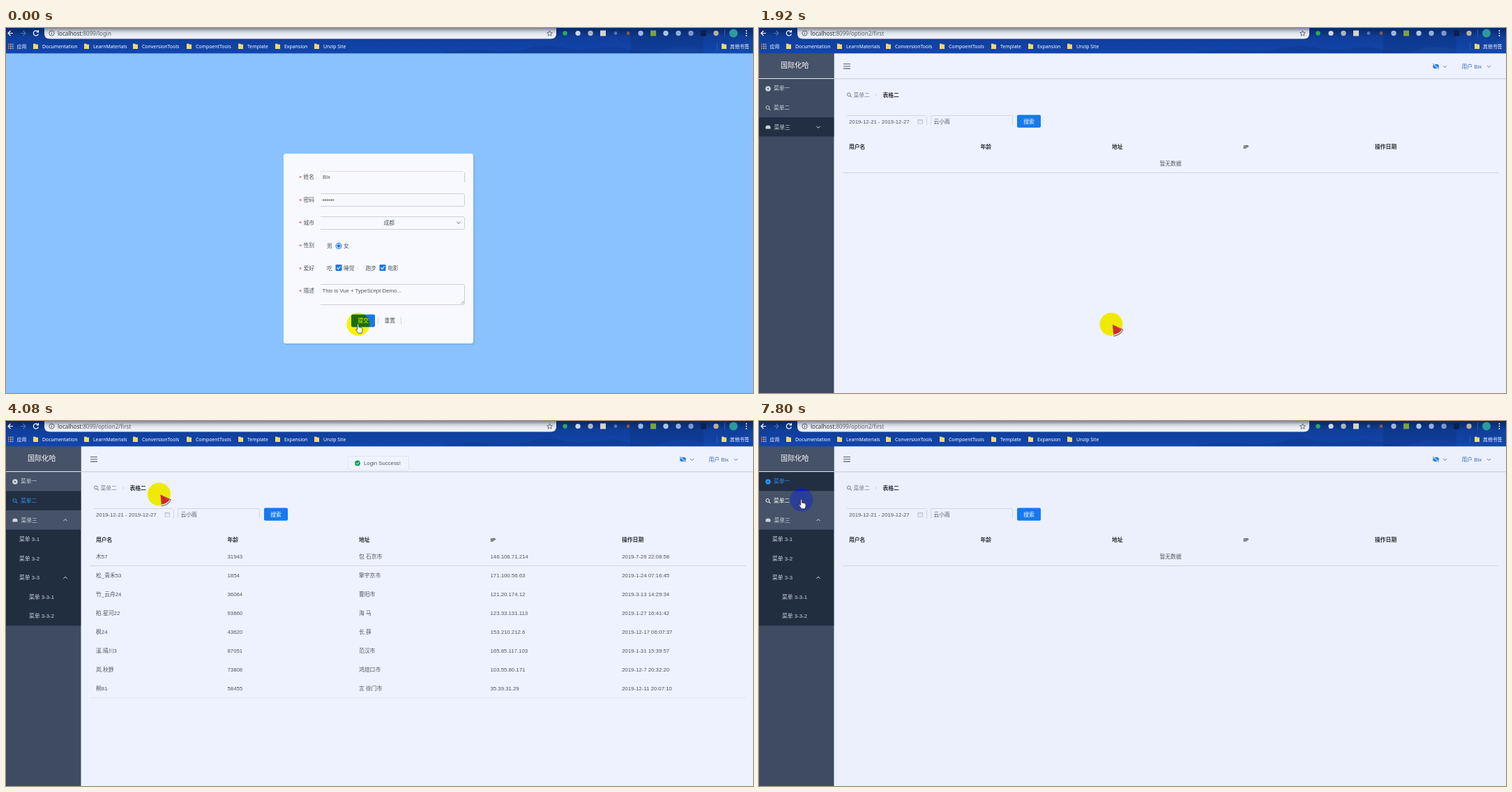
Animation, 1071 px wide and 523 px high, one loop 8000 ms. Source, as an HTML page:

```html
<!DOCTYPE html>
<html>
<head>
<meta charset="utf-8">
<title>Admin demo</title>
<style>
html, body { margin: 0; width: 100%; height: 100%; overflow: hidden; background: #8ac2ff; }
svg { display: block; width: 1071px; height: 523px; isolation: isolate; }
text { font: 7.8px "Liberation Sans", "Noto Sans CJK SC", "Noto Sans CJK", sans-serif; fill: #51565f; white-space: pre; }
.ui { font-family: "Noto Sans", "Noto Sans CJK SC", "Noto Sans CJK", sans-serif; }
.bold { font-weight: bold; fill: #2f343d; }
#spot { mix-blend-mode: difference; }
</style>
</head>
<body>
<svg id="stage" viewBox="0 0 1071 523" xmlns="http://www.w3.org/2000/svg"></svg>
<script>
const LOOP = 8000;
const USER = 'Bix';

const text = (x, y, s, attrs = '') => `<text x="${x}" y="${y + 2.8}" ${attrs}>${s}</text>`;
const rect = (x, y, w, h, fill, attrs = '') =>
  `<rect x="${x}" y="${y}" width="${w}" height="${h}" fill="${fill}" ${attrs}/>`;
const line = (d, stroke, width = 1, attrs = '') =>
  `<path d="${d}" fill="none" stroke="${stroke}" stroke-width="${width}" ${attrs}/>`;
const dot = (x, y, r, fill, attrs = '') => `<circle cx="${x}" cy="${y}" r="${r}" fill="${fill}" ${attrs}/>`;
const chevron = (x, y, color, up = 1) =>
  line(`M${x - 2.5} ${y - 1.2 * up}l2.5 ${2.5 * up} 2.5 ${-2.5 * up}`, color, 1);
const lens = (x, y, color) => line(`M${x + 1.3} ${y + 1.3}l2 2`, color, 1.1) +
  dot(x - .6, y - .6, 2.4, 'none', `stroke="${color}" stroke-width="1"`);
const group = (id, body, attrs = '') => `<g id="${id}" ${attrs}>${body}</g>`;

function browserBar() {
  const bookmarks = [['Documentation', 52], ['LearnMaterials', 125], ['ConversionTools', 195],
    ['CompoentTools', 272], ['Template', 346], ['Expansion', 399], ['Unzip Site', 455]];
  const folder = x => `<path d="M${x} 22.5h3l1 1h3v6.5h-7z" fill="#f3d675"/>`;
  const label = (x, s) => text(x, 26, s, 'class="ui" style="font-size:6.9px;fill:#fff"');
  const extensions = ['#aeb4bf', '#d8d4c4', '#5274b8', '#8a5a48', '#9db4de', '#7da33a', '#a9c6ea',
    '#8fb0dc', '#7d97c8', '#0a2150', '#b9ad9c'];
  let out = rect(0, 0, 1071, 36.4, 'url(#bar)') +
    `<path d="M620 36q40-7 75-4t60-4q25-6 45 0t70-2l50 10z" fill="#0b3480" opacity=".35"/>` +
    rect(895, 0, 105, 36, '#0a2b70', 'opacity=".3"') +
    `<path d="M930 36q30-13 60-7t81-14v21z" fill="#1a4da5" opacity=".3"/>` +
    line('M10 7.5H3m3.5-3.5L3 7.5 6.5 11', '#fff', 1.2) +
    line('M21 7.5h7m-3.5-3.5 3.5 3.5-3.5 3.5', '#4b72bd', 1.1) +
    line('M46 5.5a3.6 3.6 0 1 0 .4 3M46.5 3v3h-3', '#fff', 1.2) +
    `<path d="M55 0H789V8q0 7.5-8 7.5H63Q55 15.5 55 8z" fill="url(#omni)"/>` +
    dot(65.5, 7.5, 3.6, 'none', 'stroke="#4d535e" stroke-width=".9"') + line('M65.5 7v2.5M65.5 5.3v.9', '#4d535e', .9) +
    `<text id="url" class="ui" x="74" y="10.5" style="font-size:8.1px;fill:#5a606b"></text>` +
    `<path d="M779.5 3.8l1.1 2.6 2.8.2-2.1 1.8.7 2.8-2.5-1.5-2.5 1.5.7-2.8-2.1-1.8 2.8-.2z" fill="none" stroke="#4d535e" stroke-width=".8"/>` +
    dot(801.5, 7.5, 3.2, '#2fa85f') + dot(820, 7.5, 3.6, '#cfd8e8');
  extensions.forEach((color, i) => {
    const x = 838 + 18 * i;
    const square = i % 4 == 1;
    out += square ? rect(x - 4, 3.5, 8, 8, color) : dot(x, 7.5, i == 2 || i == 3 ? 2.4 : 3.7, color);
  });
  out += line('M1030.5 2v11', '#2d5aae') + dot(1043, 7.5, 6, '#2b9c9c');
  [4, 7.5, 11].forEach(y => out += dot(1061.5, y, .9, '#fff'));
  for (let i = 0; i < 9; i++)
    out += rect(3 + i % 3 * 2.9, 22.5 + (i / 3 | 0) * 2.9, 1.8, 1.8, ['#e8695b', '#e9b949', '#7fb2ea'][i % 3]);
  out += label(15.5, '应用') + label(1038, '其他书签') + folder(1026) + line('M1019.5 21v10', '#2d5aae');
  bookmarks.forEach(([s, x]) => out += folder(x - 13) + label(x, s));
  return out;
}

function loginPage() {
  const border = '#c9ccd6';
  const check = x => rect(x - 4.5, 339, 9, 9, '#1677e8', 'rx="1"') + line(`M${x - 2.5} 343.5l2 2 3-4`, '#fff', 1.1);
  const box = (top, height) =>
    line(`M451 ${top}H655q2.5 0 2.5 2.5v${height - 5}q0 2.5-2.5 2.5H451`, border, .9);
  let out = rect(0, 36, 1071, 487, '#8ac2ff') +
    rect(399, 182, 273, 272, '#5c94d8', 'rx="4" opacity=".35"') + rect(398, 180, 272, 272, '#f8f9ff', 'rx="3.5"');
  ['姓名', '密码', '城市', '性别', '爱好', '描述'].forEach((s, i) => {
    const y = 213.5 + 32.6 * i;
    out += text(426.5, y, s) + text(420.6, y + .8, '*', 'style="fill:#e8402f;font-weight:bold"');
  });
  out += line('M451 205.5H655', '#dfe1e8') + line('M657.5 207v14', border) +
    box(237.5, 18) + box(270.5, 18) + box(367.5, 29) +
    line('M652.5 395l4-4m-1.5 4l1.5-1.5', '#777', .7) +
    text(454, 213.5, USER) + text(541.5, 279, '成都') + chevron(649, 279, '#666') +
    text(453.5, 376, 'This is Vue + TypeScript Demo...');
  for (let i = 0; i < 6; i++) out += dot(455 + 2.8 * i, 246.5, 1, '#444');
  return out + text(460, 312, '男') + dot(477, 312.3, 3.9, '#fff', 'stroke="#1677e8" stroke-width="1.1"') +
    dot(477, 312.3, 2.4, '#1677e8') + text(484, 312, '女') +
    text(460, 344, '吃') + check(477) + text(484, 344, '睡觉') + line('M504.5 341v6M513.5 340v7', '#e3e5ec') +
    text(515.5, 344, '跑步') + check(540) + text(547, 344, '电影') +
    rect(495, 410.5, 34, 18, '#1677e8', 'rx="2" id="submit"') + text(504.5, 419.5, '提交', 'style="fill:#fff"') +
    text(542.5, 419.5, '重置') + line('M533.5 414v11M566.5 414v11', '#d5d8e0');
}

const COLUMNS = [129, 317.5, 506, 694.5, 883];
const tableOne = [
  '榆.朝露89|28606|成 廖原市|136.182.221.52|2019-5-10 18:13:52',
  '梅12|20286|珠 毛|187.117.34.27|2019-4-29 17:00:52',
  '荷50|74139|谢 龙|28.4.234.6|2019-8-1 10:38:47'];
const tableTwo = [
  '木57|31943|包 石京市|146.106.71.214|2019-7-26 22:08:58',
  '松_青禾53|1854|擎宇京市|171.100.56.63|2019-1-24 07:16:45',
  '竹_云舟24|36064|曹阳市|121.20.174.12|2019-3-13 14:29:34',
  '柏.星河22|93860|海 马|123.33.131.113|2019-1-27 16:41:42',
  '枫24|43620|长 薛|153.210.212.6|2019-12-17 06:07:37',
  '溪.晴川3|87051|范汉市|165.85.117.103|2019-1-31 15:39:57',
  '岚.秋野|73808|鸿煊口市|103.55.80.171|2019-12-7 20:32:20',
  '桐81|58455|言 徐门市|35.39.31.29|2019-12-11 20:07:10'];
const cells = (row, y, attrs) => row.split('|').map((s, i) => text(COLUMNS[i], y, s, attrs)).join('');
const tableRows = rows => rows.map((row, i) => cells(row, 194 + 27 * i)).join('');
const rule = (y, color = '#d3d7e1') => line(`M120 ${y}H1061`, color);

function homePage() {
  const field = '#d3d7e2';
  const crumb = (id, icon, a, b) => group(id, icon + text(135.5, 95.8, a, 'style="fill:#777c86"') +
    text(177.5, 95.8, b, 'class="bold"'));
  return rect(107, 36, 964, 487, '#eef2fe', 'id="page"') +
    line('M108 72.8H1071', '#c3c8d2', 1.1) +
    line('M121 51.5h10M121 54.8h10M121 58.1h10', '#5b606a', 1.1) +
    '<ellipse cx="970.5" cy="55" rx="4.4" ry="3.3" fill="#1e78e0"/>' +
    line('M966 51l9 8', '#eef2fe', 1.8) + line('M966 51l9 8', '#1e78e0', .9) + chevron(983.5, 55.3, '#66707f') +
    text(1007.5, 55, '用户 ' + USER, 'style="fill:#3b6cb5"') + chevron(1046.5, 55.3, '#5477ad') +
    crumb('crumbOne', dot(129.5, 96, 3.3, '#6d727c') + dot(129.5, 96, 1, '#eef2fe'), '菜单一', '表格一') +
    crumb('crumbTwo', lens(129.5, 96, '#777c86'), '菜单二', '表格二') +
    line('M167 94l2 2-2 2', '#c5c9d3', .8) +
    line('M126 125.5H239M240.5 127v13M246.5 139V127q0-1.5 1.5-1.5H362q1.5 0 1.5 1.5v12', field) +
    text(129, 134, '2019-12-21 - 2019-12-27') + text(250.5, 134, '云小雨') +
    rect(228, 131.5, 6.5, 5.5, 'none', 'stroke="#b4b9c4" stroke-width=".8"') + line('M228 133h6.5', '#b4b9c4', .7) +
    rect(370, 124.6, 34, 18.2, '#1579f0', 'rx="2"') + text(379.2, 134, '搜索', 'style="fill:#fff"') +
    cells('用户名|年龄|地址|IP|操作日期', 170, 'class="bold"') +
    group('empty', text(574.5, 194, '暂无数据') + rule(207.5)) +
    group('rowsTwo', tableRows(tableTwo) + rule(207.5) + rule(396.5, '#e2e6ef')) +
    group('rowsOne', tableRows(tableOne) + rule(261.5));
}

function sidebar() {
  const sub = [['菜单 3-1', 19], ['菜单 3-2', 19], ['菜单 3-3', 19], ['菜单 3-3-1', 33], ['菜单 3-3-2', 33]];
  const pale = 'style="fill:#ccd3de"';
  const inherit = 'style="fill:currentColor"';
  return rect(0, 36, 107.5, 487, '#3e4b61') + rect(0, 36, 107.5, 36, '#465268') +
    line('M0 72.5H107.5', '#e4e8f0') + text(31, 54, '国际化哈', 'style="fill:#fff;font-size:10.2px"') +
    rect(0, 73, 107.5, 27.5, '#3e4b61', 'id="bgOne"') + rect(0, 100.5, 107.5, 27.5, '#3e4b61', 'id="bgTwo"') +
    rect(0, 128, 107.5, 27.5, '#222f42', 'id="bgThree"') +
    group('itemOne', dot(13, 87, 3.8, 'currentColor') + dot(13, 87, 1.1, '#3e4b61') + text(21, 86.5, '菜单一', inherit)) +
    group('itemTwo', lens(13, 114.5, 'currentColor') + text(21, 114, '菜单二', inherit)) +
    `<path d="M9.5 144.5v-2.5q0-2.5 3.5-2.5t3.5 2.5v2.5z" fill="#ccd3de"/>` + text(21.5, 142, '菜单三', pale) +
    group('arrowDown', chevron(85, 142, '#dbe1ea')) + group('arrowUp', chevron(85, 142, '#dbe1ea', -1)) +
    `<clipPath id="fold"><rect id="foldBox" y="155.5" width="107.5" height="138"/></clipPath>` +
    group('submenu', rect(0, 155.5, 107.5, 138, '#212e40') +
      sub.map(([s, x], i) => text(x, 169.5 + 27.5 * i, s, pale)).join('') + chevron(85, 224.5, '#dbe1ea', -1),
      'clip-path="url(#fold)"');
}

const overlays = group('message', rect(490.5, 50.5, 87, 20.5, '#f1f4fe', 'rx="2" stroke="#dde1ec" stroke-width=".8"') +
    dot(504, 60.5, 3.9, '#13a05f') + line('M502 60.5l1.5 1.5 2.5-3', '#fff') + text(513, 60.5, 'Login Success!')) +
  group('tip', rect(58.5, 106.5, 27.5, 11.5, '#fafbff', 'stroke="#8a8f99" stroke-width=".6"') +
    text(62, 112.3, '菜单一', 'style="font-size:6.9px;fill:#444"'));

const pointer = dot(0, 0, 16.5, '#0008fa', 'id="spot"') +
  group('hand', `<path d="M-1.2 0q1.2-1.4 2 0v4.2q4.5.2 5.2 2v3.3l-1.2 3.3h-4.5q-2-2-3.8-5.3 .3-1.5 2.3.2z" fill="#fff" stroke="#333" stroke-width=".8"/>`) +
  group('melon', `<path d="M2 .5L17.5 7.5Q14.5 15.5 3.5 17.5z" fill="#555"/>
    <path d="M2 .5L16.5 8Q13 14.8 3.5 16.5z" fill="#e9efdc"/>
    <path d="M2 .5L15.3 7.5Q12 13.5 3.3 14.8z" fill="#d92a2a"/>` +
    dot(6, 6, .6, '#40201c') + dot(9, 9, .6, '#40201c') + dot(6, 11, .6, '#40201c'));

const stage = document.getElementById('stage');
stage.innerHTML = `<defs>
  <linearGradient id="bar" x2="0" y2="1"><stop stop-color="#0a2763"/><stop offset=".35" stop-color="#103e9a"/><stop offset="1" stop-color="#1146ad"/></linearGradient>
  <linearGradient id="omni" x2="0" y2="1"><stop stop-color="#7c8594"/><stop offset=".35" stop-color="#d0d5de"/><stop offset=".65" stop-color="#eceff5"/></linearGradient>
</defs>` + group('login', loginPage()) + group('home', homePage() + sidebar()) + browserBar() + overlays + pointer;

const el = id => document.getElementById(id);
const show = (id, on) => el(id).style.display = on ? '' : 'none';
const set = (id, name, value) => el(id).setAttribute(name, value);
const ramp = (t, a, b) => Math.min(1, Math.max(0, (t - a) / (b - a)));
const between = (t, a, b) => t >= a && t < b;

// time, x, y of the pointer hotspot
const PATH = [[0, 505, 424.5], [2760, 505, 424.5], [3290, 648, 283], [3530, 590, 222],
  [3800, 380, 140], [4080, 220, 105], [4400, 59, 94], [6700, 59, 94], [7110, 61, 113], [LOOP, 61, 113]];

function pointerAt(t) {
  const i = PATH.findIndex((p, k) => k && t <= p[0]);
  const [a, b] = [PATH[i - 1], PATH[i]];
  const k = ramp(t, a[0], b[0]);
  return [a[1] + (b[1] - a[1]) * k, a[2] + (b[2] - a[2]) * k];
}

function mix(from, to, k) {
  const part = (c, i) => parseInt(c.slice(i, i + 2), 16);
  return `rgb(${[1, 3, 5].map(i => Math.round(part(from, i) + (part(to, i) - part(from, i)) * k))})`;
}

function update(t) {
  const loggedIn = t >= 1920;
  const onOne = between(t, 5930, 7680);
  const route = t < 1680 ? 'login' : between(t, 5820, 7680) ? 'option1/first' : 'option2/first';
  el('url').innerHTML = `<tspan fill="#30353e">localhost:</tspan>8099/${route}`;

  show('login', !loggedIn);
  show('home', loggedIn);
  set('submit', 'fill', t < 1320 ? '#1677e8' : '#2f82ee');
  set('page', 'fill', t < 7680 ? '#eef2fe' : '#ebf0fc');
  show('crumbOne', onOne);
  show('crumbTwo', !onOne);
  const rowsOne = between(t, 6270, 7680), rowsTwo = between(t, 2400, 5930);
  show('rowsOne', rowsOne);
  show('rowsTwo', rowsTwo);
  show('empty', !rowsOne && !rowsTwo);

  const base = '#3e4b61', hover = '#455268', dark = '#222f42', blue = '#2d8cf0';
  const oneSelected = t >= 6160, twoSelected = between(t, 2160, 6160);
  const hoverOne = between(t, 4300, 6900), hoverTwo = t >= 6950;
  set('bgOne', 'fill', oneSelected ? mix(hover, dark, ramp(t, 6160, 6380)) : t > 2160 ? hover : base);
  set('bgTwo', 'fill', twoSelected ? mix(base, dark, ramp(t, 2160, 2400)) : hoverTwo ? hover :
    t < 2160 ? base : mix(dark, base, ramp(t, 6160, 6420)));
  set('bgThree', 'fill', mix(dark, hover, ramp(t, 2160, 2500)));
  el('itemOne').style.color = oneSelected ? blue : hoverOne ? '#ffffff' : '#ccd3de';
  el('itemTwo').style.color = twoSelected ? blue : hoverTwo ? '#ffffff' : '#ccd3de';
  set('foldBox', 'height', 138 * ramp(t, 2160, 2500));
  show('arrowDown', t < 2280);
  show('arrowUp', t >= 2280);

  const shown = ramp(t, 2380, 2620) * (1 - ramp(t, 4080, 4330));
  set('message', 'opacity', shown);
  set('message', 'transform', `translate(0 ${-14 * (1 - shown)})`);
  show('tip', between(t, 5200, 5930));

  const [x, y] = pointerAt(t);
  const melon = between(t, 1680, 4300);
  for (const id of ['spot', 'hand', 'melon']) set(id, 'transform', `translate(${x} ${y})`);
  set('spot', 'fill', x < 107 ? '#1a14ff' : '#0008fa');
  show('melon', melon);
  show('hand', !melon);
}

const start = performance.now();
function frame() {
  update((performance.now() - start) % LOOP);
  requestAnimationFrame(frame);
}
frame();
</script>
</body>
</html>
```
